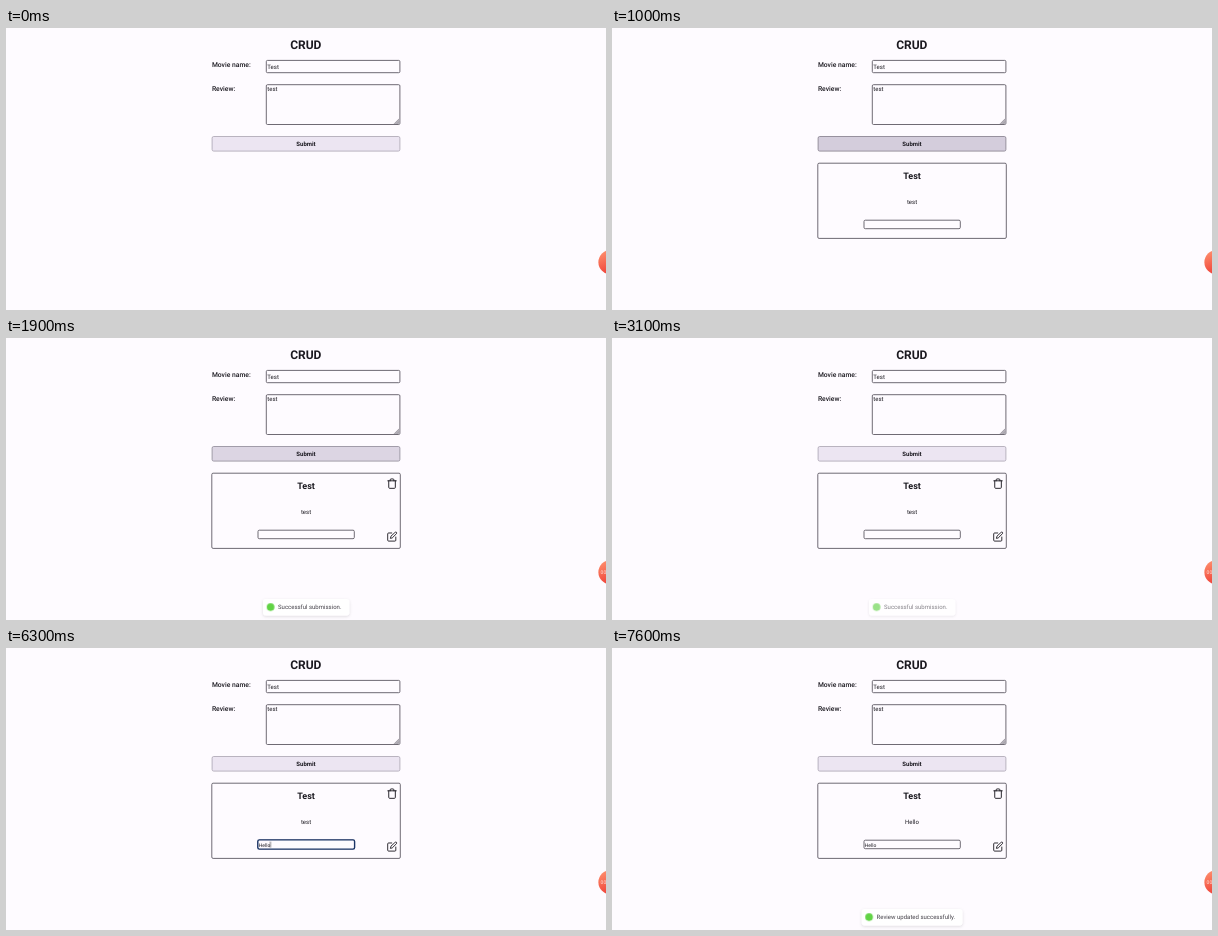
Animation, 600 px wide and 282 px high, one loop 8 s. Source, as an HTML page:

```html
<!DOCTYPE html>
<html lang="en">
<head>
<meta charset="utf-8">
<title>CRUD</title>
<style>
  html, body { margin: 0; width: 100%; height: 100%; overflow: hidden; background: #fefbff; }
  svg { display: block; width: 600px; height: 282px; }
  text { font: 400 6.02px Roboto, sans-serif; fill: #1b1920; text-rendering: geometricPrecision; }
  .mid { text-anchor: middle; }
  .h1 { font-size: 12.03px; font-weight: 700; }
  .h2 { font-size: 9.02px; font-weight: 700; }
  .label { font-size: 6.77px; font-weight: 500; }
  .bold { font-weight: 700; }
  .small { font-size: 5.01px; }
  .note text { fill: #45424a; }
  .box { fill: #fefbff; stroke: #55515b; stroke-width: .85; }
  .icon { fill: none; stroke: #1b1920; stroke-width: 2; stroke-linecap: round; stroke-linejoin: round; }

  /* One loop is 8 s, so 1% is 80 ms. */
  .step { animation: 8s step-end infinite; }
  .btn { stroke-width: .8; animation: hover 8s linear infinite; }
  .card { animation-name: card; }
  .tools { animation-name: tools; }
  .rec { animation-name: rec; }
  .focus { animation-name: focus; }
  .caret { animation-name: caret; }
  .typed { transform-origin: 252.8px 0; animation-name: typed; }
  .before { animation-name: before; }
  .after { animation-name: after; }
  .note { animation: 8s linear infinite; }
  .sent { --at: 1.03s; animation-name: sent; }
  .updated { --at: 7.13s; animation-name: updated; }
  .pop { animation: pop 8s calc(var(--at) + .1s) infinite backwards; }
  .tick { fill: none; stroke: #fff; stroke-width: 2; stroke-dasharray: 1 2;
          animation: tick 8s calc(var(--at) + .2s) infinite backwards; }

  @keyframes hover {
    0%, 10.9%, 25%, 100% { fill: #ece5f2; stroke: #aaa4b2; }
    12.2%, 23.2% { fill: #d4cddc; stroke: #837d8b; }
  }
  @keyframes card {
    0%, 13.6% { visibility: hidden; }
    12.2%, 19.8%, 100% { visibility: visible; }
  }
  @keyframes tools { 0% { opacity: 0; } 19.8%, 100% { opacity: 1; } }
  @keyframes rec { 0% { opacity: 0; } 23.6%, 100% { opacity: 1; } }
  @keyframes focus { 0%, 87.3%, 100% { opacity: 0; } 44.8% { opacity: 1; } }
  @keyframes caret {
    0%, 51%, 62.3%, 84.8%, 100% { opacity: 0; transform: none; }
    44.8% { opacity: 1; transform: none; }
    57.3% { opacity: 1; transform: translateX(3.8px); }
    78.6% { opacity: 1; transform: translateX(11.4px); }
  }
  @keyframes typed {
    0% { transform: scaleX(0); }
    57.3% { transform: scaleX(3.57); }
    62.3% { transform: scaleX(6.22); }
    63.6% { transform: scaleX(7.43); }
    64.8% { transform: scaleX(8.65); }
    71%, 100% { transform: scaleX(14); }
  }
  @keyframes before { 0% { opacity: 1; } 88.6%, 100% { opacity: 0; } }
  @keyframes after { 0% { opacity: 0; } 88.6%, 100% { opacity: 1; } }
  @keyframes sent {
    0%, 12.875% { opacity: 0; animation-timing-function: cubic-bezier(.21, 1.02, .73, 1); }
    17.25% { opacity: 1; }
    38.375% { opacity: 1; animation-timing-function: cubic-bezier(.06, .71, .55, 1); }
    43.375%, 100% { opacity: 0; }
  }
  @keyframes updated {
    0%, 89.125% { opacity: 0; animation-timing-function: cubic-bezier(.21, 1.02, .73, 1); }
    93.5%, 100% { opacity: 1; }
  }
  @keyframes pop {
    0% { transform: scale(0); animation-timing-function: cubic-bezier(.175, .885, .32, 1.275); }
    3.75%, 100% { transform: scale(1); }
  }
  @keyframes tick {
    0% { stroke-dashoffset: 1; opacity: 0; animation-timing-function: ease-out; }
    .1% { opacity: 1; }
    2.5%, 100% { stroke-dashoffset: 0; opacity: 1; }
  }
</style>
</head>
<body>
<svg viewBox="0 0 600 282">
  <defs>
    <linearGradient id="red" x1=".1" y1="0" x2=".5" y2="1">
      <stop offset="0" stop-color="#ff9470"/>
      <stop offset="1" stop-color="#ee3c35"/>
    </linearGradient>
    <filter id="shadow" x="-10%" y="-40%" width="120%" height="200%">
      <feDropShadow dx="0" dy="1.1" stdDeviation="1.6" flood-color="#000" flood-opacity=".13"/>
    </filter>
    <clipPath id="typed"><rect class="step typed" x="252.8" y="190" width="1" height="13"/></clipPath>
    <g id="badge">
      <circle r="10" fill="#61d345"/>
      <path class="tick" pathLength="1" d="M-4.95-.7-1.41 2.83 4.95-3.54"/>
    </g>
  </defs>

  <text class="h1 mid" x="299.8" y="20.8">CRUD</text>
  <text class="label" x="205.9" y="38.5">Movie name:</text>
  <rect class="box" x="260.3" y="32.4" width="133.6" height="12.3" rx="1.2"/>
  <text x="261.3" y="41">Test</text>
  <text class="label" x="205.9" y="62.6">Review:</text>
  <rect class="box" x="260.3" y="56.7" width="133.6" height="39.8" rx="1.2"/>
  <text x="261.3" y="63.3">test</text>
  <path d="M393.4 90.2V96H387.6Z" fill="#b5b1b9"/>
  <path d="M388.3 95.6 393.2 90.7M391 95.6 393.2 93.4" stroke="#8a868e" stroke-width=".5"/>

  <rect class="btn" x="206.1" y="108.5" width="187.8" height="14.6" rx="1.6"/>
  <text class="bold mid" x="300" y="117.7">Submit</text>

  <g class="step card">
    <rect class="box" x="205.8" y="135.2" width="188.5" height="75.2" rx="1.3"/>
    <text class="h2 mid" x="300" y="151.2">Test</text>
    <text class="mid step before" x="300" y="176.4">test</text>
    <text class="mid step after" x="300" y="176.4">Hello</text>
    <rect class="box" x="252" y="192.2" width="96.3" height="8.5" rx="1.3"/>
    <rect class="step focus" x="251.8" y="191.9" width="96.8" height="9.2" rx="1.5" fill="#fefbff" stroke="#1b3566" stroke-width="1.4"/>
    <text class="small" x="252.8" y="198.5" clip-path="url(#typed)">Hello</text>
    <rect class="step caret" x="252.7" y="193.6" width=".6" height="6" fill="#1b1920"/>
    <g class="step tools">
      <path class="icon" transform="translate(380.4 140) scale(.47)"
        d="M3 6H21M19 6V20a2 2 0 0 1-2 2H7a2 2 0 0 1-2-2V6M8 6V4a2 2 0 0 1 2-2h4a2 2 0 0 1 2 2V6"/>
      <path class="icon" transform="translate(380.8 193.2) scale(.45)"
        d="M11 4H4a2 2 0 0 0-2 2V20a2 2 0 0 0 2 2H18a2 2 0 0 0 2-2V13M18.5 2.5a2.12 2.12 0 0 1 3 3L12 15l-4 1 1-4Z"/>
    </g>
  </g>

  <circle cx="604.6" cy="234.2" r="12.2" fill="url(#red)"/>
  <text class="step rec" x="594.6" y="236.2" style="font-size:5px;fill:#ffe3dd">00:12</text>

  <g class="note sent">
    <rect x="257" y="261" width="86.4" height="16.6" rx="3" fill="#fff" filter="url(#shadow)"/>
    <g transform="translate(264.6 269.1) scale(.385)"><g class="pop"><use href="#badge"/></g></g>
    <text x="272" y="271.3">Successful submission.</text>
  </g>
  <g class="note updated">
    <rect x="249.7" y="261" width="100.8" height="16.6" rx="3" fill="#fff" filter="url(#shadow)"/>
    <g transform="translate(257.1 269.1) scale(.385)"><g class="pop"><use href="#badge"/></g></g>
    <text x="264.6" y="271.3">Review updated successfully.</text>
  </g>
</svg>
</body>
</html>
```
